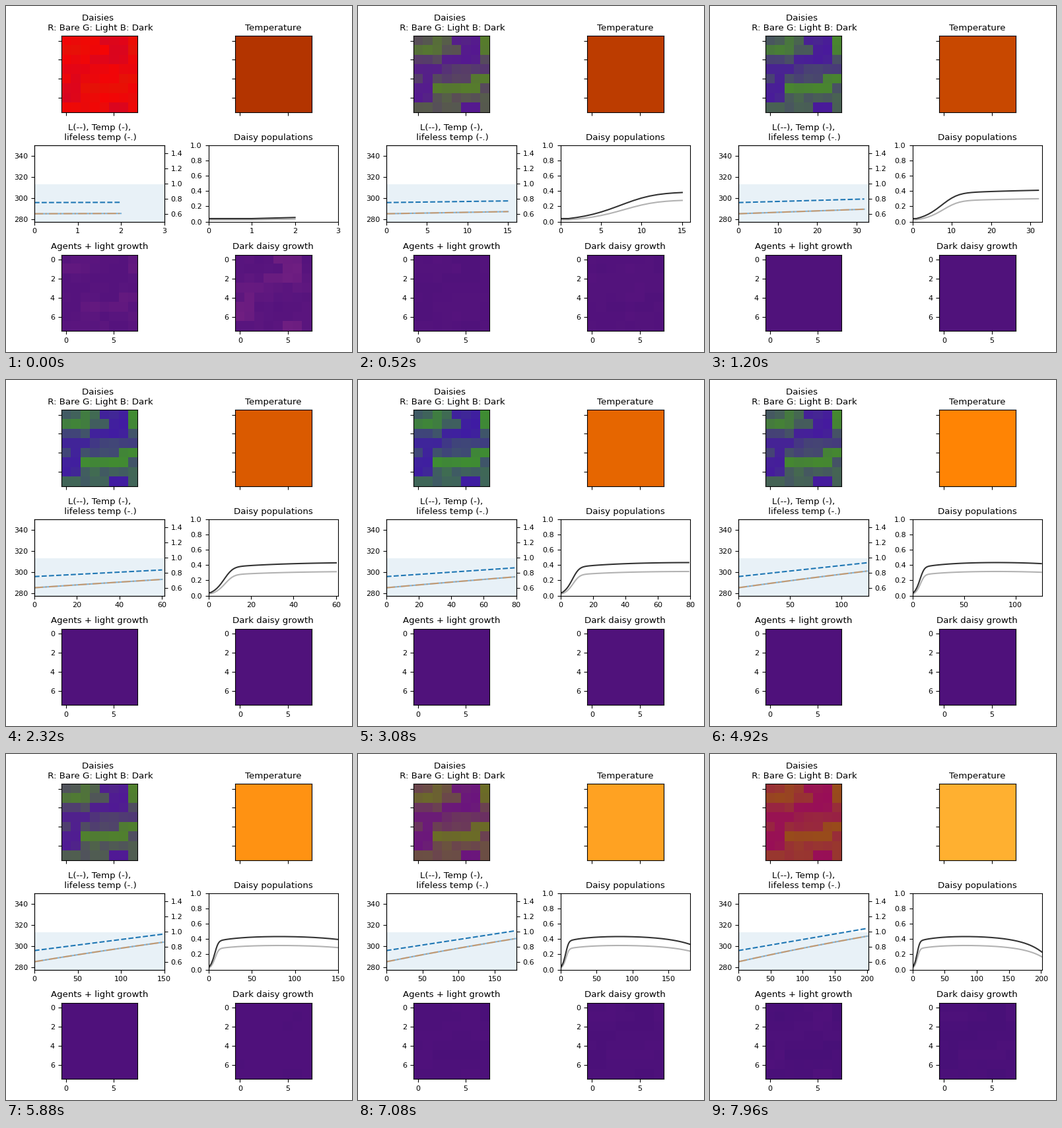
Write a matplotlib script that moves like this. It is 524 by 524 pixels and loops after 8 s.

```python
import numpy as np
import matplotlib.pyplot as plt
from matplotlib.animation import FuncAnimation

plt.rcParams["font.size"] = 8
SIZE, DPI = 524, 100
FRAMES, STEP_MS = 200, 40
N, DEATH, T_OPT = 8, 0.25, 295.5

# Runs of cells (row, first column, length) where one kind of daisy leads.
LIGHT_RUNS = [(0, 2, 1), (0, 7, 1), (1, 0, 3), (1, 7, 1), (4, 6, 2), (5, 2, 5)]
DARK_RUNS = [(0, 4, 3), (1, 5, 2), (2, 3, 4), (3, 0, 3), (4, 1, 1),
             (5, 0, 2), (6, 0, 2), (7, 5, 2)]


def dark_share(rng):
    row = np.arange(N)[:, None]
    share = np.full((N, N), 0.47) + 0.18 * np.exp(-((row - 3) / 1.5) ** 2)
    for runs, level in ((LIGHT_RUNS, 0.29), (DARK_RUNS, 0.8)):
        for r, c, n in runs:
            share[r, c:c + n] = level
    share += rng.uniform(-0.05, 0.05, share.shape)
    return np.clip(share + 0.578 - share.mean(), 0, 1)


def first_cover(share, rng):
    # Cells led by one kind start out with more daisies.
    cover = 0.04 + 0.6 * (share - 0.5) ** 2 + rng.uniform(0, 0.05, share.shape)
    return cover * 0.088 / cover.mean()


# Luminosity ramp, black-body temperature and growth rate.
time = np.arange(FRAMES + 2)
lum = 0.75 + 0.00145 * time
temp = 285 * (lum / 0.75) ** 0.25
beta = np.clip(1 - 0.003265 * (T_OPT - temp) ** 2, 0, 1)


def net_growth(cover, t):
    return cover * ((1 - cover) * beta[t] - DEATH)


rng = np.random.default_rng(4)
share = dark_share(rng)
second = first_cover(share, rng)
covers = [second / 1.365, second / 1.365, second]
for t in range(2, FRAMES + 1):
    covers.append(covers[-1] + net_growth(covers[-1], t))
covers = np.array(covers)
dark_pop = (covers * share).mean(axis=(1, 2))
light_pop = (covers * (1 - share)).mean(axis=(1, 2))

fig, axes = plt.subplots(3, 2, figsize=(SIZE / DPI, SIZE / DPI), dpi=DPI,
                         facecolor="white")


def grid(ax, title, labels=True, shape=(N, N), **kw):
    ax.set_title(title)
    ax.tick_params(labelleft=labels, labelbottom=labels)
    return ax.imshow(np.zeros(shape), **kw)


growth = dict(cmap="magma", vmin=-0.125, vmax=0.375)
daisies = grid(axes[0, 0], "Daisies \n R: Bare G: Light B: Dark", False, (N, N, 3))
heat = grid(axes[0, 1], "Temperature", False, cmap="afmhot", vmin=250, vmax=350)
light_map = grid(axes[2, 0], "Agents + light growth", **growth)
dark_map = grid(axes[2, 1], "Dark daisy growth", **growth)

ax_temp, ax_pop = axes[1]
ax_temp.set_title("L(--), Temp (-),\n lifeless temp (-.)")
ax_temp.axhspan(270, 313.2, color="C0", alpha=0.1, lw=0)
ax_lum = ax_temp.twinx()
ax_pop.set_title("Daisy populations")


def curve(ax, style, values, alpha=1):
    return ax.plot([], [], style, alpha=alpha)[0], values


curves = [curve(ax_temp, "C0-", temp, 0.5),
          curve(ax_temp, "C1-.", temp, 0.5),
          curve(ax_lum, "C0--", lum),
          curve(ax_pop, "k-", light_pop, 0.3),
          curve(ax_pop, "k-", dark_pop, 0.8)]

for ax, low, high in ((ax_temp, 277.5, 350), (ax_lum, 0.5, 1.5), (ax_pop, 0, 1)):
    ax.set_xlim(0, 1)
    ax.set_ylim(low, high)
fig.tight_layout()


def update(i):
    t = i + 2
    cover = covers[t]
    daisies.set_data(np.dstack([1 - cover, cover * (1 - share), cover * share]))
    heat.set_data(np.full((N, N), temp[t]))
    change = net_growth(cover, t)
    light_map.set_data(change * (1 - share))
    dark_map.set_data(change * share)
    for line, values in curves:
        line.set_data(time[:t + 1], values[:t + 1])
    for ax in (ax_temp, ax_pop):
        ax.set_xlim(0, t + 1)
    return []


anim = FuncAnimation(fig, update, frames=FRAMES, interval=STEP_MS,
                     init_func=lambda: update(0), repeat=True, repeat_delay=0)
plt.show()
```
